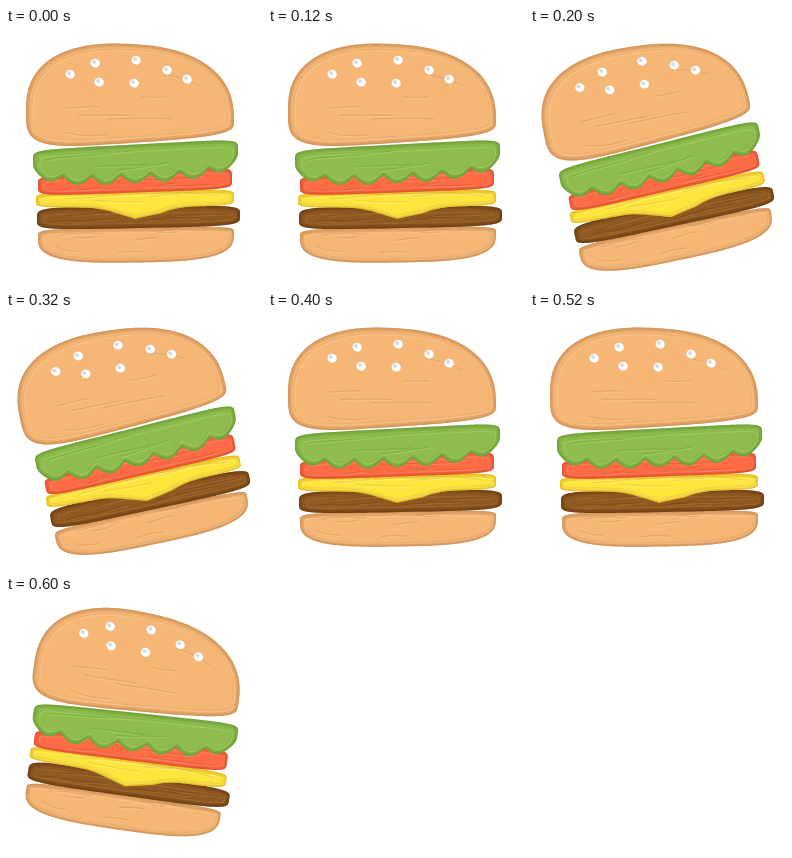
Recreate the animation shown at these times as an HTML page with a canvas. Size 256 by 256 pixels, loop 800 ms.

```html
<!DOCTYPE html>
<html lang="en">
<head>
<meta charset="utf-8">
<title>Wobbling burger</title>
<style>
  html, body { margin: 0; width: 100%; height: 100%; overflow: hidden; background: #fff; }
  canvas { display: block; width: 256px; height: 256px; }
</style>
</head>
<body>
<canvas id="stage" width="256" height="256"></canvas>
<script>
const ctx = document.getElementById('stage').getContext('2d');
const HOLD = 200;
const TURNS = [0, -11, 0, 9.1];
const PIVOT = [126.5, 127.3];

const lerp = ([a, b], u) => a + (b - a) * u;
const bend = (v, n) => Math.sign(v) * Math.abs(v) ** (2 / n);

function randomizer(seed) {
  return () => {
    seed = (seed * 16807) % 2147483647;
    return seed / 2147483647;
  };
}

// A layer is a superellipse around a sloping middle line. Pairs run left to right;
// `round` holds the corner powers above and below, `hang` lowers the bottom edge.
const bun = { color: '#f5b676', dark: '#b0763c', light: '#ffd09a' };
const layers = [
  { ...bun, x: [32, 228], mid: [209, 205], up: [8, 7], down: [27, 28], round: [5, 3.1], ridges: 7 },
  { color: '#8f5922', dark: '#4f2c0b', light: '#b47a3b',
    x: [31, 234], mid: [191, 187], up: [12, 10], down: [11, 11], round: [5, 5], ridges: 9 },
  { color: '#ffe63d', dark: '#c79c10', light: '#fff596',
    x: [30, 228], mid: [172, 169], up: [7, 8], down: [8, 9], round: [6, 6], ridges: 5,
    hang: u => 12 * Math.exp(-(((u - 0.52) / 0.14) ** 2)) },
  { color: '#ff6b45', dark: '#c43f1e', light: '#ff9775',
    x: [32, 226], mid: [157, 151], up: [9, 13], down: [11, 10], round: [6, 6], ridges: 7 },
  { ...bun, x: [20, 228], mid: [82, 92], up: [71, 71], down: [40, 16], round: [2.4, 4], ridges: 6 },
  { color: '#8fbc4c', dark: '#55842a', light: '#b4dc74',
    x: [27, 232], mid: [135, 124], up: [13, 13], down: [17, 17], round: [7, 3], ridges: 6,
    hang: u => 9 * Math.abs(Math.sin(7 * Math.PI * u)) }
];

// Seeds alternate between an upper and a lower row, following the dome.
const seeds = [[64, 46], [89, 35], [93, 54], [130, 32], [128, 55], [161, 42], [181, 51]];

function outline({ x, mid, up, down, round, hang = () => 0 }, inset = 0) {
  const path = new Path2D();
  const half = (x[1] - x[0]) / 2;
  const steps = 360;
  for (let i = 0; i < steps; i++) {
    const a = i / steps * Math.PI * 2;
    const below = Math.sin(a) > 0;
    const n = round[below ? 1 : 0];
    const t = bend(Math.cos(a), n) * (1 - inset / half);
    const u = (t + 1) / 2;
    const reach = below ? lerp(down, u) + hang(u) : lerp(up, u);
    path.lineTo((x[0] + x[1]) / 2 + t * half,
      lerp(mid, u) + bend(Math.sin(a), n) * Math.max(1, reach - inset));
  }
  path.closePath();
  return path;
}

// Short brush marks that run along the layer.
function brushMarks(layer, seed) {
  const rnd = randomizer(seed * 7919 + 11);
  const path = new Path2D();
  for (let i = 0; i < layer.ridges; i++) {
    const from = 0.05 + rnd() * 0.65;
    const length = 0.1 + rnd() * 0.22;
    const level = rnd() * 1.3 - 0.6;
    const wave = rnd() * 6;
    for (let k = 0; k <= 12; k++) {
      const u = Math.min(0.95, from + length * k / 12);
      const reach = lerp(level < 0 ? layer.up : layer.down, u);
      const px = lerp(layer.x, u);
      const py = lerp(layer.mid, u) + level * reach * (1 - (2 * u - 1) ** 4)
        + Math.sin(wave + k / 4);
      k ? path.lineTo(px, py) : path.moveTo(px, py);
    }
  }
  return path;
}

layers.forEach((layer, i) => {
  layer.shape = outline(layer);
  layer.rim = outline(layer, Math.min(6, layer.up[0] / 2));
  layer.marks = brushMarks(layer, i + 1);
});

function line(path, color, alpha, width, shift = 0) {
  ctx.save();
  ctx.translate(shift, shift);
  ctx.globalAlpha = alpha;
  ctx.strokeStyle = color;
  ctx.lineWidth = width;
  ctx.stroke(path);
  ctx.restore();
}

// Thick paint: soft dark edge, raised rim and brush marks.
function paint({ color, dark, light, shape, rim, marks }) {
  ctx.fillStyle = color;
  ctx.fill(shape);
  ctx.save();
  ctx.clip(shape);
  for (let width = 2; width <= 8; width += 2) line(shape, dark, 0.15, width);
  line(rim, light, 0.35, 2, 0.8);
  line(rim, dark, 0.15, 1.5);
  line(marks, light, 0.4, 1.4, 1);
  line(marks, dark, 0.25, 1.3);
  ctx.restore();
}

function dot(x, y, r, color) {
  ctx.fillStyle = color;
  ctx.beginPath();
  ctx.ellipse(x, y, r, r * 0.92, 0.4, 0, Math.PI * 2);
  ctx.fill();
}

function drawSeed([x, y]) {
  dot(x, y, 5.2, '#dcc7b2');
  dot(x + 0.2, y + 0.2, 4.6, '#fff');
  dot(x - 1, y - 1, 2, '#dddad6');
}

function draw(now) {
  const turn = TURNS[Math.floor(now / HOLD) % TURNS.length];
  ctx.setTransform(1, 0, 0, 1, 0, 0);
  ctx.fillStyle = '#fff';
  ctx.fillRect(0, 0, 256, 256);
  ctx.translate(...PIVOT);
  ctx.rotate(turn * Math.PI / 180);
  ctx.translate(-PIVOT[0], -PIVOT[1]);
  ctx.lineCap = ctx.lineJoin = 'round';
  layers.forEach(paint);
  seeds.forEach(drawSeed);
}

let start;
function tick(now) {
  start ??= now;
  draw(Math.max(0, now - start));
  requestAnimationFrame(tick);
}
draw(0);
requestAnimationFrame(tick);
</script>
</body>
</html>
```
